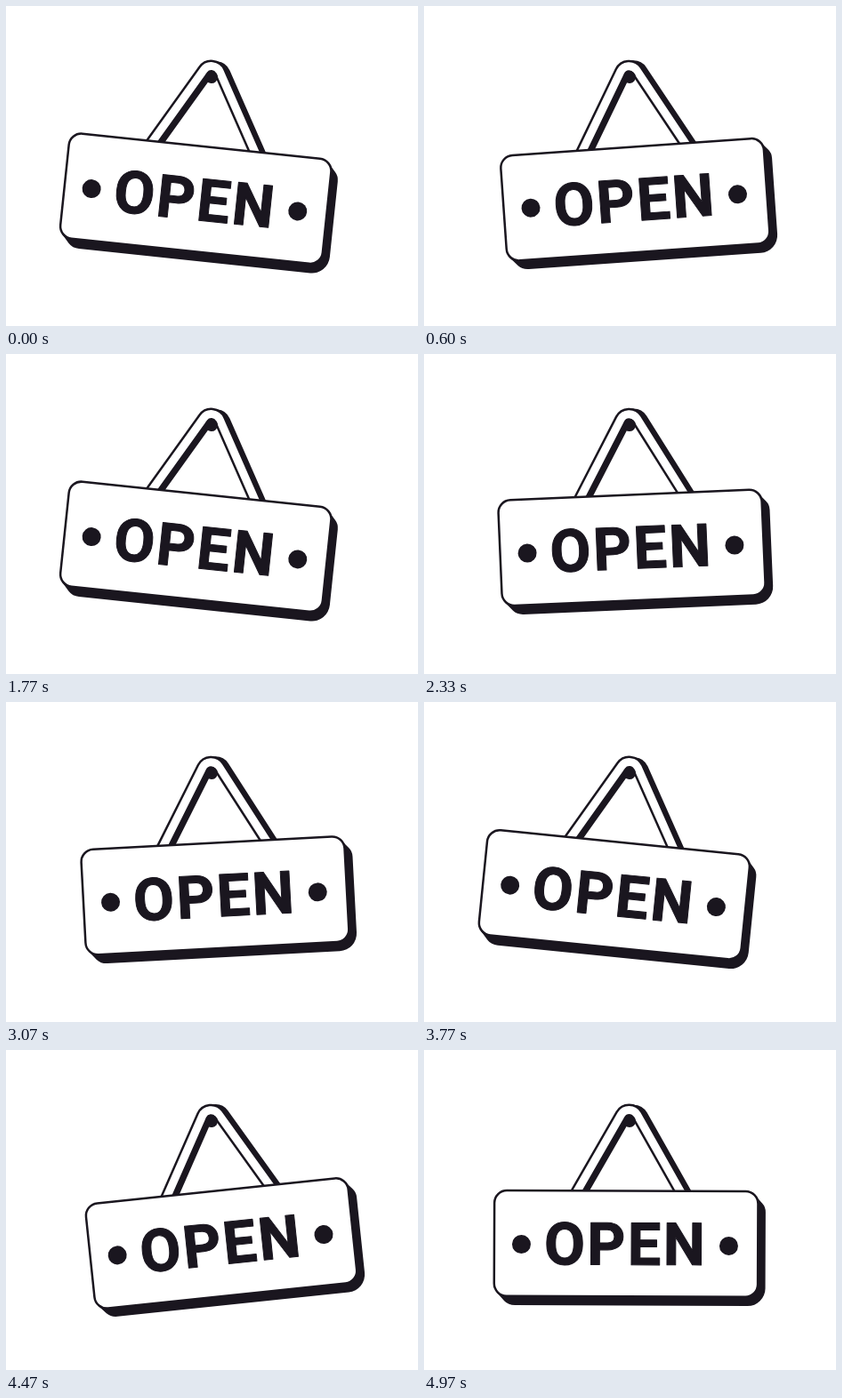
Animation, 463 px wide and 360 px high, one loop 5000 ms. Source, as an HTML page:

```html
<!DOCTYPE html>
<html lang="en">
<head>
<meta charset="utf-8">
<title>Swinging sign</title>
<style>
  html, body { margin: 0; width: 100%; height: 100%; overflow: hidden; background: #fff; }
  svg { display: block; width: 463px; height: 360px; }
  text { font: 700 66.5px Roboto, Arial, sans-serif; letter-spacing: 2.5px; text-anchor: middle; }
</style>
</head>
<body>
<svg viewBox="0 0 463 360" fill="#1a161f" stroke-linejoin="round">
  <defs>
    <path id="strap" fill="none" d="M169 165L221.5 72.8A10.4 10.4 0 0 1 239.5 72.8L292 165"/>
  </defs>
  <g id="sign" stroke="#1a161f">
    <g stroke-width="14">
      <use href="#strap" x="5" y="1"/>
      <use href="#strap"/>
    </g>
    <use href="#strap" stroke="#fff" stroke-width="9"/>
    <circle cx="231" cy="80" r="7" stroke="none"/>
    <!-- extruded side of the board -->
    <path stroke="none" d="M82.3 273L91 282.8Q95.5 287.6 103 287.6H364.3A20 20 0 0 0 384.3 267.6V182Q384.3 176 380.5 172L372 162.5Z"/>
    <rect x="79.5" y="158.5" width="296.3" height="118.7" rx="14" fill="#fff" stroke-width="2.5"/>
    <g stroke="none">
      <circle cx="110" cy="219" r="10.5"/>
      <circle cx="343" cy="220" r="10.5"/>
    </g>
    <text x="227.2" y="241.7" stroke-width="1">OPEN</text>
  </g>
</svg>
<script>
  const LOOP = 5000, SWING = 900, ANGLE = 6, FPS = 30, DELAY = 11;
  const sign = document.getElementById('sign');
  const ease = x => x < 0.5 ? 4 * x ** 3 : 1 - 4 * (1 - x) ** 3;

  function angleAt(ms) {
    const t = Math.max(0, ms - DELAY) / SWING;
    const side = Math.floor(t) % 2 ? -1 : 1;
    return side * ANGLE * (1 - 2 * ease(t % 1));
  }

  const start = performance.now();
  function draw() {
    const t = (performance.now() - start) % LOOP;
    const step = Math.floor((t + 5) * FPS / 1000) % (LOOP * FPS / 1000);
    sign.setAttribute('transform', `rotate(${angleAt(step * 1000 / FPS)} 231 80)`);
    requestAnimationFrame(draw);
  }
  draw();
</script>
</body>
</html>
```
